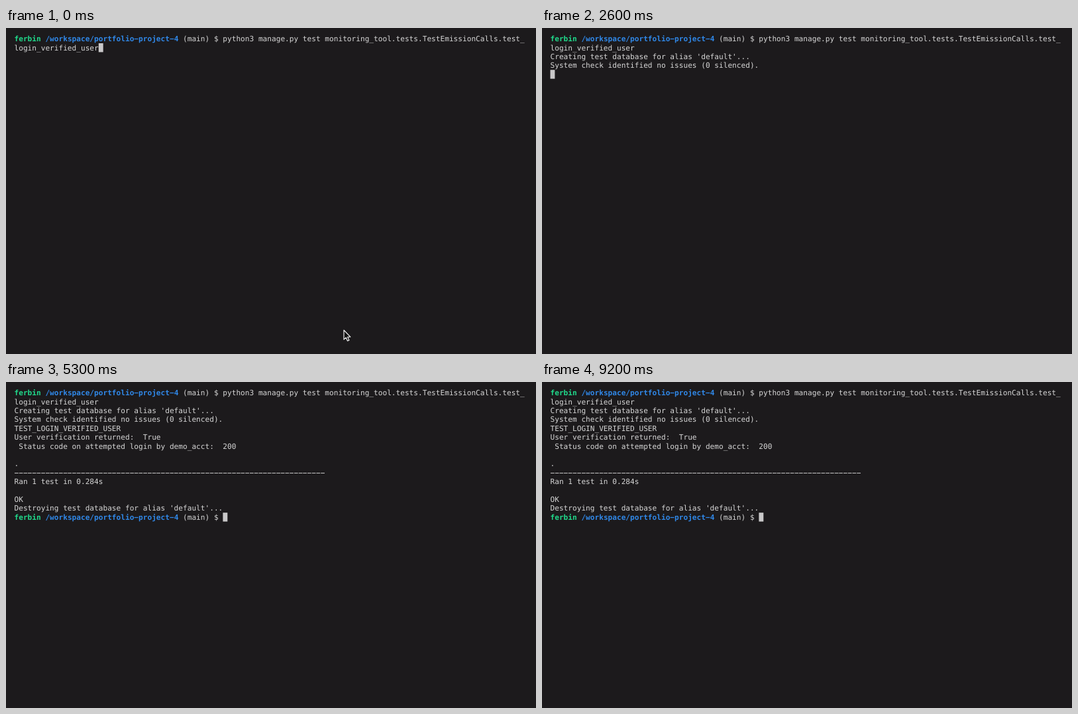
These frames come from a looping animation (800x492 px, 9300 ms). An HTML page:

```html
<!DOCTYPE html>
<html lang="en">
<head>
<meta charset="utf-8">
<title>Terminal test run</title>
<style>
  html, body { margin: 0; width: 100%; height: 100%; overflow: hidden; background: #1c1a1c; }
  svg { display: block; width: 800px; height: 492px; }
  text {
    font: 11.13px "DejaVu Sans Mono", monospace;
    text-rendering: geometricPrecision;
    white-space: pre;
    fill: #d6d6d6;
  }
  .user, .path { font-weight: bold; }
  .user { fill: #20d98b; }
  .path { fill: #3088e8; }
  #cursor { fill: #c9c8c9; }
</style>
</head>
<body>
<svg viewBox="0 0 800 492">
  <g id="screen"></g>
  <rect id="cursor" width="6.9" height="13.4"/>
  <path id="pointer" d="M510 456V470.2L513.2 467.2L515.5 472.3L517.9 471.2L515.6 466.2H519.8Z"
        fill="#111" stroke="#fff" stroke-width="1.1" stroke-linejoin="round"/>
</svg>
<script>
const LOOP = 9300;
const LEFT = 12.5, TOP = 9.6, CELL = 6.7, ROW = 13.4, BASELINE = 10.5;
const POINTER_HIDES = 1000;

const prompt = [['user', 'ferbin'], ['', ' '], ['path', '/workspace/portfolio-project-4'], ['', ' (main) $ ']];
const plain = text => [['', text]];

// Each step prints its lines from startRow, then parks the cursor at [column, row].
const steps = [
  { at: 0, startRow: 0, cursor: [19, 1], lines: [
    [...prompt, ['', 'python3 manage.py test monitoring_tool.tests.TestEmissionCalls.test_']],
    plain('login_verified_user')] },
  { at: 1000, startRow: 2, cursor: [0, 2], lines: [] },
  { at: 1900, startRow: 2, cursor: [0, 3], lines: [
    plain("Creating test database for alias 'default'...")] },
  { at: 2600, startRow: 3, cursor: [0, 4], lines: [
    plain('System check identified no issues (0 silenced).')] },
  { at: 2900, startRow: 4, cursor: [0, 14], lines: [
    plain('TEST_LOGIN_VERIFIED_USER'),
    plain('User verification returned:  True'),
    plain(' Status code on attempted login by demo_acct:  200'),
    plain(''),
    plain('.'),
    plain('-'.repeat(70)),
    plain('Ran 1 test in 0.284s'),
    plain(''),
    plain('OK'),
    plain("Destroying test database for alias 'default'...")] },
  { at: 3200, startRow: 14, cursor: [47, 14], lines: [prompt] },
];

const byId = id => document.getElementById(id);
const cursor = byId('cursor'), pointer = byId('pointer');

function add(parent, tag, attributes) {
  const node = document.createElementNS('http://www.w3.org/2000/svg', tag);
  for (const [name, value] of Object.entries(attributes)) node.setAttribute(name, value);
  return parent.appendChild(node);
}

for (const step of steps) {
  step.group = add(byId('screen'), 'g', {});
  step.lines.forEach((line, i) => {
    const y = TOP + (step.startRow + i) * ROW + BASELINE;
    const text = add(step.group, 'text', { x: LEFT, y });
    for (const [style, content] of line) {
      // The terminal face has wide hyphens, so show them as minus signs.
      add(text, 'tspan', { class: style }).textContent = content.replace(/-/g, '\u2212');
    }
  });
}

const show = (node, visible) => node.setAttribute('visibility', visible ? 'visible' : 'hidden');

function draw(time) {
  let current = steps[0];
  for (const step of steps) {
    const reached = time >= step.at;
    show(step.group, reached);
    if (reached) current = step;
  }
  const [column, row] = current.cursor;
  cursor.setAttribute('x', LEFT + column * CELL);
  cursor.setAttribute('y', TOP + row * ROW);
  show(pointer, time < POINTER_HIDES);
}

const start = performance.now();
function tick() {
  draw((performance.now() - start) % LOOP);
  requestAnimationFrame(tick);
}
tick();
</script>
</body>
</html>
```
